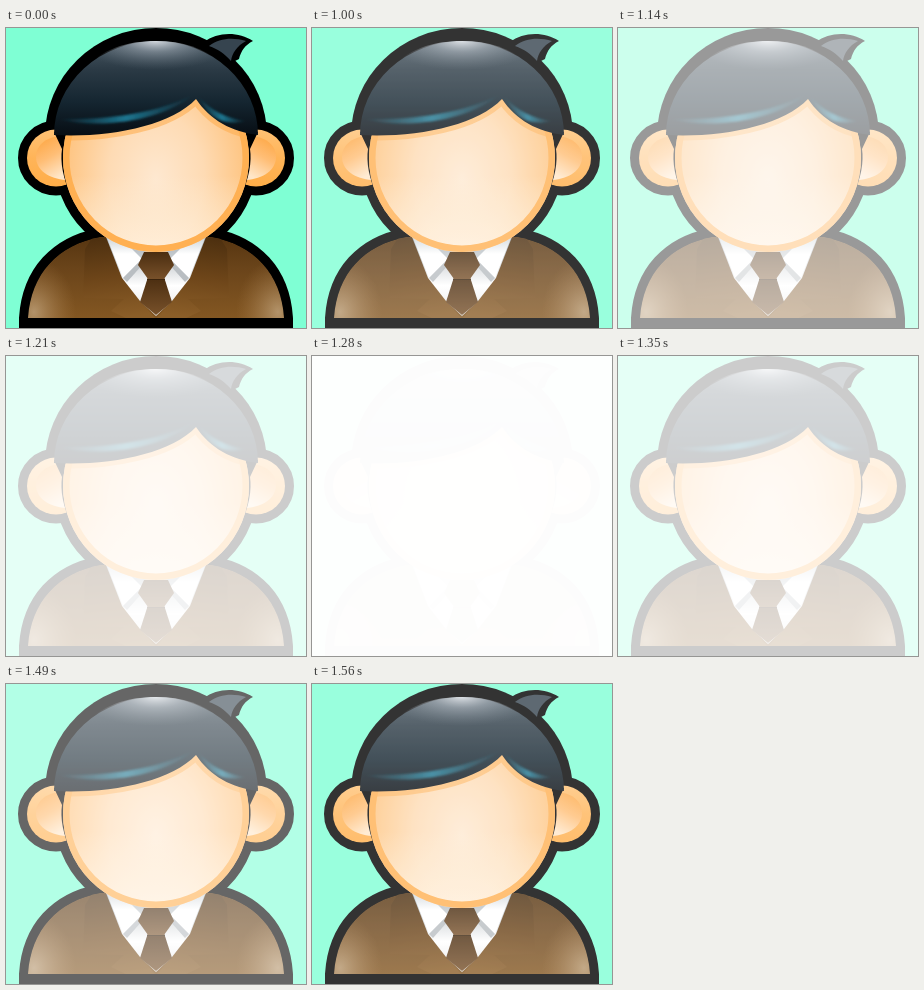
An HTML page for the animation above (1.63 s loop, 300x300 px).

```html
<!DOCTYPE html>
<html lang="en">
<head>
<meta charset="utf-8">
<style>
  html, body { margin: 0; width: 100%; height: 100%; overflow: hidden; background: #fff; }
  svg { display: block; width: 100%; height: 100%; }
</style>
</head>
<body>
<svg viewBox="0 0 300 300">
  <defs>
    <radialGradient id="skin" gradientUnits="userSpaceOnUse" cx="0" cy="0" r="1" gradientTransform="translate(150 150) scale(96 130)">
      <stop offset="0" stop-color="#fee8d0"/>
      <stop offset=".5" stop-color="#fedbb4"/>
      <stop offset="1" stop-color="#fec27c"/>
    </radialGradient>
    <linearGradient id="chinGlow" x1="0" y1="0" x2="0" y2="1">
      <stop offset=".6" stop-color="#fff3e2" stop-opacity="0"/>
      <stop offset="1" stop-color="#fff3e2" stop-opacity=".75"/>
    </linearGradient>
    <linearGradient id="ear" x1="0" y1="0" x2="0" y2="1">
      <stop offset="0" stop-color="#ffc173"/>
      <stop offset=".5" stop-color="#ffb458"/>
      <stop offset="1" stop-color="#ffad48"/>
    </linearGradient>
    <linearGradient id="earInner" x1=".2" y1="0" x2=".6" y2="1">
      <stop offset="0" stop-color="#fda642"/>
      <stop offset=".5" stop-color="#ffbe76"/>
      <stop offset="1" stop-color="#ffe6c8"/>
    </linearGradient>
    <linearGradient id="hair" gradientUnits="userSpaceOnUse" x1="0" y1="13" x2="0" y2="108">
      <stop offset="0" stop-color="#4a5964"/>
      <stop offset=".3" stop-color="#2b3a45"/>
      <stop offset=".65" stop-color="#142530"/>
      <stop offset="1" stop-color="#070d13"/>
    </linearGradient>
    <radialGradient id="shine" gradientUnits="userSpaceOnUse" cx="0" cy="0" r="1" gradientTransform="translate(150 12) scale(78 30)">
      <stop offset="0" stop-color="#eef1f5" stop-opacity=".9"/>
      <stop offset=".4" stop-color="#a5afb9" stop-opacity=".5"/>
      <stop offset="1" stop-color="#6b7883" stop-opacity="0"/>
    </radialGradient>
    <linearGradient id="teal">
      <stop offset="0" stop-color="#1c7c98" stop-opacity="0"/>
      <stop offset=".5" stop-color="#1f86a3" stop-opacity=".85"/>
      <stop offset="1" stop-color="#1c7c98" stop-opacity="0"/>
    </linearGradient>
    <filter id="soft" x="-20%" y="-50%" width="140%" height="200%"><feGaussianBlur stdDeviation="1.2"/></filter>
    <linearGradient id="coat" gradientUnits="userSpaceOnUse" x1="0" y1="207" x2="0" y2="290">
      <stop offset="0" stop-color="#553410"/>
      <stop offset=".4" stop-color="#6a441a"/>
      <stop offset="1" stop-color="#835722"/>
    </linearGradient>
    <radialGradient id="coatGlow">
      <stop offset="0" stop-color="#c4a882" stop-opacity=".75"/>
      <stop offset="1" stop-color="#a87c48" stop-opacity="0"/>
    </radialGradient>
    <linearGradient id="lapel" x1=".2" y1="0" x2=".3" y2="1">
      <stop offset="0" stop-color="#4c2f0f"/>
      <stop offset=".5" stop-color="#6d4519"/>
      <stop offset="1" stop-color="#8b5e28"/>
    </linearGradient>
    <linearGradient id="tie" x1="0" y1="0" x2="0" y2="1">
      <stop offset="0" stop-color="#4a2d10"/>
      <stop offset="1" stop-color="#78512a"/>
    </linearGradient>
    <linearGradient id="shirt" gradientUnits="userSpaceOnUse" x1="0" y1="212" x2="0" y2="288">
      <stop offset="0" stop-color="#a9b2b8"/>
      <stop offset=".4" stop-color="#dde0e2"/>
      <stop offset=".6" stop-color="#fff"/>
      <stop offset="1" stop-color="#e4e4e4"/>
    </linearGradient>
    <linearGradient id="flap" x1="0" y1="0" x2="0" y2="1">
      <stop offset="0" stop-color="#cfd6da"/>
      <stop offset=".4" stop-color="#fff"/>
    </linearGradient>
    <path id="body" d="M22 290C25 245 52 217 94 209H206C248 217 275 245 278 290Z"/>
    <path id="fringe" d="M48 107C104 110 164 98 190 71C204 92 226 104 252 107"/>
    <clipPath id="bodyClip"><use href="#body"/></clipPath>
    <clipPath id="faceClip"><ellipse cx="150" cy="130" rx="93" ry="94"/></clipPath>
    <g id="earShape">
      <ellipse cx="50" cy="130" rx="29" ry="28.5" fill="url(#ear)"/>
      <path d="M60 108C42 107 30 116 30 129C30 142 43 151 60 152Z" fill="url(#earInner)"/>
    </g>
    <g id="jacketSide">
      <ellipse cx="28" cy="284" rx="42" ry="54" fill="url(#coatGlow)"/>
      <path d="M86 210L79 221L77 270L118 271L105 283L122 291H150L134 273L116 250L101 209Z" fill="url(#lapel)"/>
    </g>
    <g id="collar">
      <path d="M101 210L117 250L136 231L122 217Z" fill="url(#flap)"/>
      <path d="M117 250L136 231L138 235L121 254Z" fill="#b9bec2"/>
    </g>
  </defs>

  <rect width="300" height="300" fill="#7fffd4"/>

  <g stroke="#000" stroke-width="18" stroke-linejoin="round">
    <use href="#body"/>
    <ellipse cx="50" cy="130" rx="29" ry="28.5"/>
    <ellipse cx="250" cy="130" rx="29" ry="28.5"/>
    <ellipse cx="150" cy="130" rx="93" ry="94"/>
  </g>
  <path d="M39 108A111 108 0 0 1 261 108Z"/>
  <path d="M198 14C211 4 232 3 247 13C239 17 235 23 233 31L215 40Z"/>
  <rect x="13" y="290" width="274" height="10"/>

  <use href="#earShape"/>
  <use href="#earShape" transform="matrix(-1 0 0 1 300 0)"/>
  <path d="M48 104H65V168Q53 141 56 121ZM252 104H235V168Q247 141 244 121Z"/>

  <g clip-path="url(#bodyClip)">
    <use href="#body" fill="url(#coat)"/>
    <use href="#jacketSide"/>
    <use href="#jacketSide" transform="matrix(-1 0 0 1 300 0)"/>
    <path d="M100 209L116 250L134 273L150 288L166 273L184 250L200 209Z" fill="url(#shirt)"/>
    <use href="#collar"/>
    <use href="#collar" transform="matrix(-1 0 0 1 300 0)"/>
    <path d="M142 249H158L166 274L150 287L134 274Z" fill="url(#tie)"/>
    <path d="M138 224H162L168 237L158 251H142L132 237Z" fill="url(#tie)"/>
    <path d="M141 251.5H159" stroke="#3b240d"/>
  </g>

  <g clip-path="url(#faceClip)">
    <rect x="57" y="36" width="186" height="188" fill="url(#skin)"/>
    <ellipse cx="150" cy="130" rx="88" ry="88" fill="url(#chinGlow)"/>
    <g fill="none" stroke="#ffb052">
      <ellipse cx="150" cy="130" rx="93" ry="94" stroke-width="13"/>
      <use href="#fringe" stroke-width="10" opacity=".6"/>
    </g>
  </g>

  <path d="M48 107A102 94 0 0 1 252 107C226 104 204 92 190 71C164 98 104 110 48 107Z" fill="url(#hair)"/>
  <path d="M203 18C213 10 227 9 240 13C231 18 226 25 225 33C219 26 212 21 203 18Z" fill="#36444f"/>
  <path d="M76 43C95 21 121 13 150 13C177 13 197 20 214 34C189 48 111 53 76 43Z" fill="url(#shine)"/>
  <g fill="url(#teal)" filter="url(#soft)">
    <path d="M52 91C94 92 150 87 188 66C162 90 99 103 52 91Z"/>
    <path d="M192 68C205 83 220 90 240 93C219 99 201 89 192 68Z"/>
  </g>

  <rect id="veil" width="300" height="300" fill="#fff" opacity="0"/>
</svg>
<script>
  const LOOP = 1630, HOLD = 1000, STEP = 70;
  const fade = [.2, .4, .6, .8, .99, .8, .6, .4, .2];
  const veil = document.getElementById('veil');
  const start = performance.now();

  function draw() {
    const time = (performance.now() - start) % LOOP;
    veil.setAttribute('opacity', time < HOLD ? 0 : fade[Math.floor((time - HOLD) / STEP)]);
    requestAnimationFrame(draw);
  }
  draw();
</script>
</body>
</html>
```
